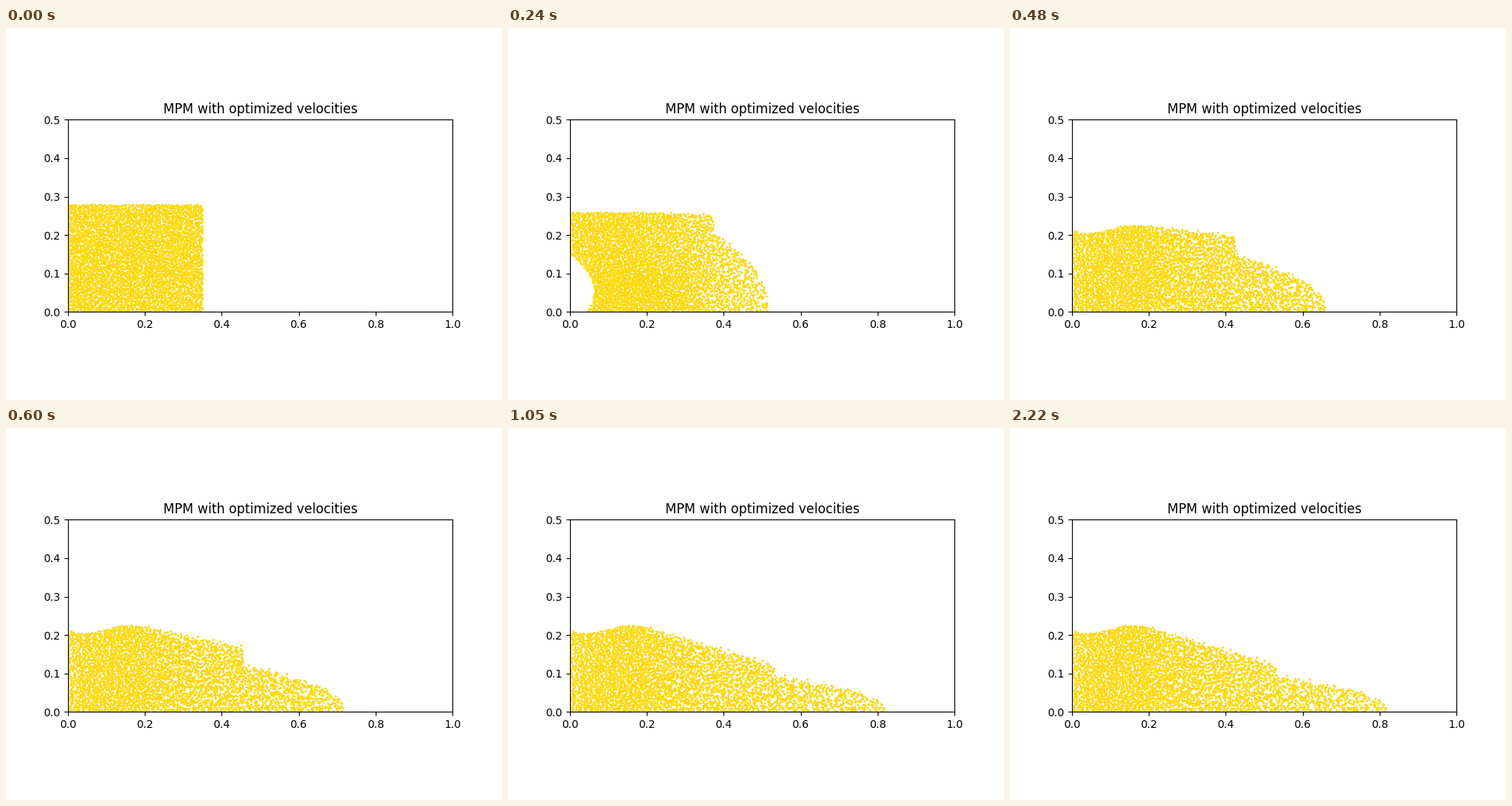
These frames come from a looping animation (640 by 480 pixels, 2.28 s). A matplotlib script:

```python
import numpy as np
import matplotlib.pyplot as plt
from matplotlib.animation import FuncAnimation

FRAMES, STEP = 76, 30
WIDTH, HEIGHT = 0.35, 0.28      # block at rest
COLUMNS, ROWS = 75, 60
FIXED = 0.18                    # the top left of this stops once it has fallen

# Jittered grid over the unit square: u runs along the heap, v up each column.
rng = np.random.default_rng(4)
grid_u, grid_v = np.meshgrid(np.arange(COLUMNS), np.arange(ROWS))
u = (grid_u.ravel() + rng.random(grid_u.size)) / COLUMNS
v = (grid_v.ravel() + rng.random(grid_v.size)) / ROWS
roughness = 0.004 * rng.normal(size=u.size)


def ramp(t, duration):
    return min(t / duration, 1)


def smooth(t, duration):
    s = ramp(t, duration)
    return s * s * (3 - 2 * s)


def tip_at(t):
    return WIDTH + 0.474 * np.sin(np.pi / 2 * ramp(t, 1.05))


def surface(x, t):
    """Height of the heap: fallen top, straight slope, step, rounded toe."""
    tip = tip_at(t)
    corner = WIDTH + 0.18 * smooth(t, 1.08)
    corner_height = HEIGHT - 0.16 * smooth(t, 0.93)
    foot_height = 0.23 - 0.138 * smooth(t, 0.84)

    settled = np.interp(x, [0, 0.02, 0.07, 0.14, FIXED],
                        [0.216, 0.205, 0.208, 0.226, 0.226])
    fallen = np.maximum(settled, HEIGHT - 0.35 * t ** 2)
    along = np.clip((x - FIXED) / (corner - FIXED), 0, 1)
    top = fallen + along * (corner_height - fallen)

    foot = corner + 0.005
    s = np.clip((x - foot) / max(tip - foot, 1e-6), 0, 1)
    toe = foot_height * (1 - s) ** 0.45
    return np.where(x <= corner, top, toe)


def gap_at(y, t):
    """Hollow that opens beside the wall and closes again."""
    level = y / (1.4 - t / 0.6)
    hollow = np.clip(1 - ((level - 0.055) / 0.095) ** 2, 0, None)
    return 0.062 * np.sin(np.pi * t / 0.48) * hollow if t < 0.48 else 0


def particles(t):
    """Fill the area under the surface, thinning towards wall and tip."""
    tip = tip_at(t)
    edges = np.linspace(0, tip, 1601)
    mid = (edges[1:] + edges[:-1]) / 2
    spread = ramp(t, 0.6)
    density = (1 - spread * (0.05 + 0.3 * np.exp(-mid / 0.03))) / (WIDTH * HEIGHT)
    mass = density * surface(mid, t) * edges[1]
    tail = np.clip((mid - FIXED) / (tip - FIXED), 0, 1)
    thinning = (mass.sum() - 1) / (mass * tail).sum()
    cumulative = np.append(0, np.cumsum(mass * (1 - thinning * tail)))

    x = np.interp(u, cumulative, edges)
    rough = spread * roughness * np.clip((x - FIXED) / 0.1, 0, 1)
    y = np.abs(v * surface(x, t) + rough)
    return x + gap_at(y, t) * np.clip(1 - x / WIDTH, 0, 1), y


fig, ax = plt.subplots(figsize=(6.4, 4.8), dpi=100)
ax.set_aspect("equal")
ax.set_xlim(0, 1)
ax.set_ylim(0, 0.5)
ax.set_title("MPM with optimized velocities")
dots, = ax.plot([], [], "o", color="gold", markersize=1)


def update(frame):
    dots.set_data(*particles(frame * STEP / 1000))
    return dots,


anim = FuncAnimation(fig, update, frames=FRAMES, interval=STEP, repeat=True)
plt.show()
```
